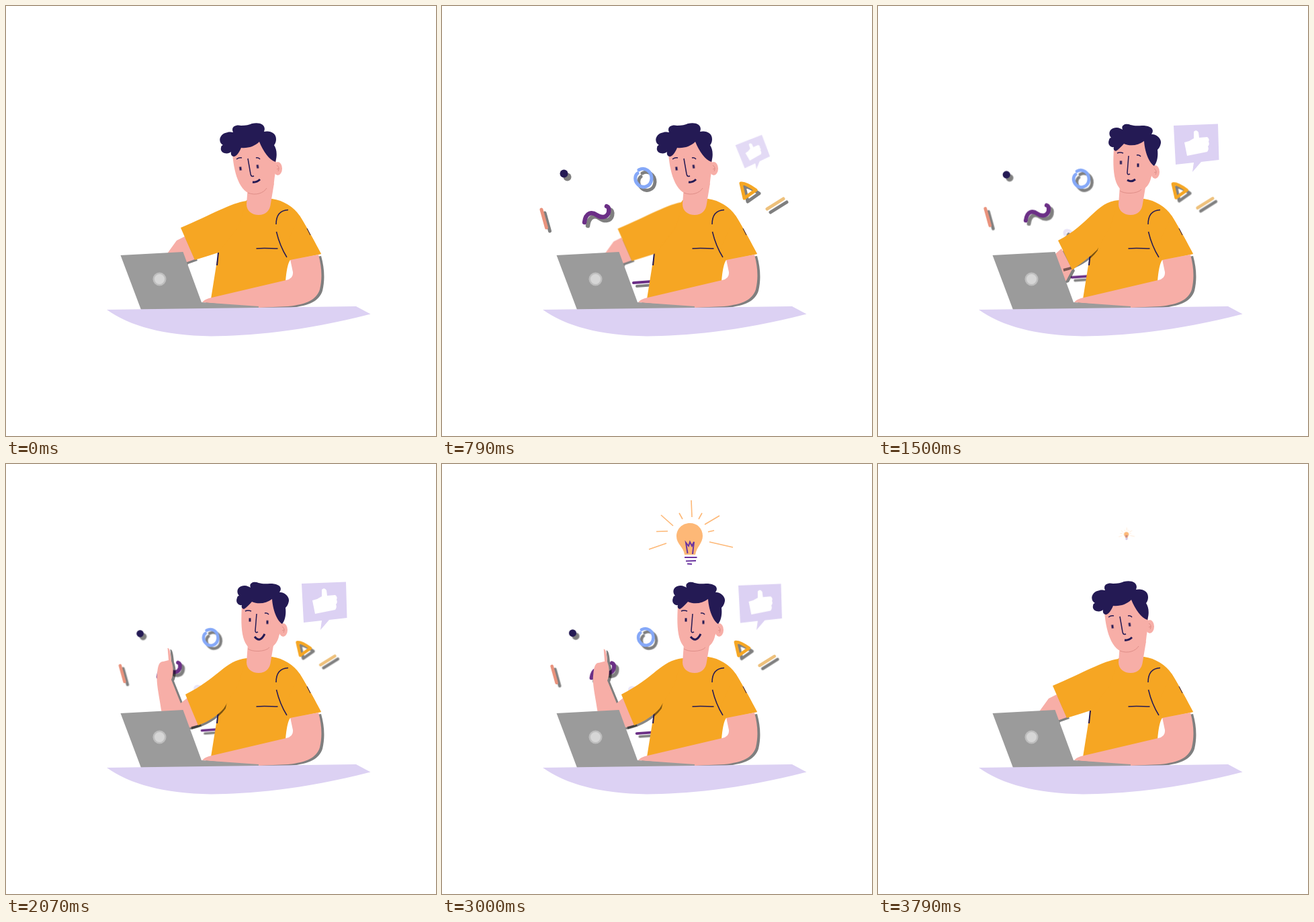
Animation, 640 px wide and 640 px high, one loop 3.87 s. Source, as an HTML page:

```html
<!DOCTYPE html>
<html lang="en">
<head>
<meta charset="utf-8">
<title>Bright idea at the desk</title>
<style>
  html, body { margin: 0; width: 100%; height: 100%; overflow: hidden; background: #fff; }
  svg { display: block; width: 100vw; height: 100vh; }

  .skin { fill: #f7aea7; }
  .shirt { fill: #f6a623; }
  .ink { fill: #241a54; }
  .line { fill: none; stroke: #241a54; stroke-width: 1.5; }
  .crease { fill: none; stroke: #d98781; stroke-width: .8; }
  .lilac { fill: #dcd1f3; }
  .round { fill: none; stroke-width: 5; stroke-linecap: round; stroke-linejoin: round; }
  .rays { fill: none; stroke: #fdb877; stroke-width: 1.6; }
  .shade { filter: drop-shadow(4px 2px 0 #00000080); }

  .anim, .pose { animation: 3.87s infinite; }
  .anim { animation-timing-function: cubic-bezier(.37, 0, .63, 1); }
  .pose { animation-timing-function: ease-in-out; }

  #confetti { animation-name: burst; transform-origin: 343px 276px; filter: drop-shadow(5px 5px 0 #00000080); }
  @keyframes burst {
    0%, 1% { transform: scale(0); animation-timing-function: ease-out; }
    12.9% { transform: scale(1.035); }
    20.4% { transform: scale(1); }
    23.5% { transform: scale(1.003); }
    33.8% { transform: scale(.885); }
    44.3% { transform: scale(1.005); }
    54% { transform: scale(.887); }
    65.1% { transform: scale(1.005); }
    72.4% { transform: scale(.92); }
    76.2% { transform: scale(.97); }
    85% { transform: scale(.07); }
    87.5%, 100% { transform: scale(0); }
  }

  #bubble { animation-name: like; transform-origin: 468px 247px; }
  @keyframes like {
    0%, 16.5% { transform: rotate(-30deg) scale(0); opacity: .6; animation-timing-function: linear; }
    20.4% { transform: translateY(-4px) rotate(-19deg) scale(.64); opacity: .8; }
    24% { transform: rotate(0deg) scale(1.4); opacity: 1; }
    31.3% { transform: scale(1.1); }
    35% { transform: scale(.97); }
    38.7%, 76% { transform: scale(1); opacity: 1; }
    85% { transform: scale(.45); opacity: 1; }
    88.6%, 100% { transform: scale(0); }
  }

  #bulb { animation-name: idea; transform-origin: 370px 104px; }
  @keyframes idea {
    0%, 53.5% { transform: scale(0); }
    59.2% { transform: scale(1.74); }
    61% { transform: scale(1.9); }
    66.4% { transform: scale(1.03); }
    68.2%, 79% { transform: scale(1); animation-timing-function: ease-in; }
    85% { transform: scale(.96); animation-timing-function: linear; }
    97.9% { transform: scale(.19); opacity: 1; }
    100% { transform: scale(0); opacity: .7; }
  }

  #arm { animation-name: typing; }
  @keyframes typing {
    0%, 14.7%, 29.5%, 100% { transform: none; }
    7.4% { transform: translate(2px, 2px); }
    20.4% { transform: translate(1.5px, 1.5px); }
  }

  #forearm { animation-name: forearm; }
  @keyframes forearm {
    0%, 30%, 93%, 100% { d: path("M238 390C239 388 239 386 240 384C240 378 240 372 241 367L254 349L266 343L281 377L267 382C262 395 250 395 245 395C243 395 241 395 240 394C239 394 239 393 238 392L238 391Z"); }
    37.5%, 42% { d: path("M240 402C240 400 240 399 241 398C241 395 242 390 243 385L264 369L273 361L289 392L280 409C272 412 262 412 258 412C253 412 248 411 246 410C243 408 241 406 240 405L240 403Z"); }
    52%, 76% { d: path("M240.5 274C243 273 245 279 246 293C250 303 249 315 246 321L260 356L270 348L287 388L272 393C250 395 234 385 231 366C228 345 223 325 225 312C226 300 228 294 234 294L242 292Z"); }
    85% { d: path("M243 302C246 301 247 306 248 320C252 330 250 340 247 343L259 355L268 348L285 386L271 389C250 395 236 385 233 366C231 358 228 350 228 338C228 326 229 322 235 322L244 320Z"); }
  }

  #sleeve { animation-name: sleeve; }
  @keyframes sleeve {
    0%, 30%, 93%, 100% { d: path("M358 290C335 293 305 311 260 330C267 346 274 362 281 378C293 374 305 371 316 367L345 330Z"); }
    37.5%, 42% { d: path("M358 289C325 291 315 325 268 349C276 365 283 380 289 393C302 383 315 374 326 363L345 330Z"); }
    52%, 76% { d: path("M358 289C325 293 317 318 267 343C274 360 280 375 286 389C303 383 315 374 324 364L345 330Z"); }
    85% { d: path("M358 290C327 293 313 320 266 341C273 358 280 373 286 388C301 381 312 374 321 366L345 330Z"); }
  }

  #fold { animation-name: fold; }
  @keyframes fold {
    0%, 31%, 85%, 100% { opacity: 0; }
    38%, 76% { opacity: 1; }
  }

  #face { animation-name: face; }
  @keyframes face {
    0%, 29.5%, 94.6%, 100% { d: path("M337 220C340 255 350 281 372 281C389 281 398 272 399 262C400 250 404 235 401 226L378 200L350 209Z"); }
    36.2%, 77.5% { d: path("M351 212C349 245 350 279 377 279C396 278 404 266 406 257C408 250 412 240 411 232L397 201L366 204Z"); }
  }

  #hair { animation-name: hair; }
  @keyframes hair {
    0%, 29.5%, 94.6%, 100% { d: path("M340 224C336 224 334 221 335 217C330 222 318 219 320 211C320 208 322 207 323 207C315 203 317 190 330 188C333 187 336 188 338 188C334 179 343 176 350 178C357 178 362 177 366 175C378 172 388 177 384 187C393 185 402 189 402 198C402 203 400 206 399 207C403 213 404 222 401 232C392 229 383 217 377 202C370 209 360 212 350 211C348 216 344 223 340 224Z"); }
    36.2%, 77.5% { d: path("M354 216C351 215 350 213 351 210C346 211 341 206 344 199C344 197 346 196 347 196C341 189 346 181 355 181C359 181 362 183 364 184C361 177 369 174 376 177C383 179 388 178 393 178C404 178 413 182 407 191C414 190 422 197 421 204C420 210 417 213 416 214C417 222 416 232 411 238C403 233 397 216 396 201C387 208 375 209 366 205C362 209 358 214 354 216Z"); }
  }

  #chin { animation-name: chin; }
  @keyframes chin {
    0%, 29.5%, 94.6%, 100% { d: path("M360 278C372 283 384 278 388 271"); }
    36.2%, 77.5% { d: path("M360 275C366 280 386 280 392 273"); }
  }

  #ear { animation-name: ear; }
  @keyframes ear {
    0%, 29.5%, 94.6%, 100% { transform: none; }
    36.2%, 77.5% { transform: translate(8px, 5px); }
  }

  #brows { animation-name: brows; }
  @keyframes brows {
    0%, 29.5%, 94.6%, 100% { d: path("M343 228Q347 225 351 226M372 226Q376 225 378 228"); }
    36.2%, 77.5% { d: path("M356 219Q360 217 365 219M385 222Q389 221 391 224"); }
  }

  #nose { animation-name: nose; }
  @keyframes nose {
    0%, 29.5%, 94.6%, 100% { d: path("M360 227L364 250Q365 255 369 253"); }
    36.2%, 77.5% { d: path("M373 223L371 248Q371 252 375 250"); }
  }

  #mouth { animation-name: mouth; stroke-width: 3; }
  @keyframes mouth {
    0%, 29.5%, 94.6%, 100% { d: path("M367 262Q373 263 378 258"); }
    36.2%, 42% { d: path("M371 259Q377 263 383 258"); }
    50%, 77.5% { d: path("M370 257Q378 267 385 253"); }
  }

  #eye1 { animation-name: eye1; }
  @keyframes eye1 {
    0%, 29.5%, 94.6%, 100% { transform: translate(349px, 242px) rotate(-8deg); }
    36.2%, 42% { transform: translate(361.5px, 233px) rotate(0deg); }
    50%, 77.5% { transform: translate(363px, 232px) rotate(0deg); }
  }
  #eye2 { animation-name: eye2; }
  @keyframes eye2 {
    0%, 29.5%, 94.6%, 100% { transform: translate(374.5px, 239px) rotate(-8deg); }
    36.2%, 42% { transform: translate(387px, 237px) rotate(0deg); }
    50%, 77.5% { transform: translate(389px, 235.5px) rotate(0deg); }
  }
  .lid { animation-name: blink; }
  @keyframes blink {
    0%, 66%, 70.5%, 100% { transform: none; }
    67.5%, 69% { transform: scaleY(.15); }
  }
</style>
</head>
<body>
<svg viewBox="0 0 640 640">
  <g id="confetti" class="anim round">
    <circle class="ink" cx="181.5" cy="249.5" r="6"/>
    <path stroke="#e9927c" d="M148 303L155.5 330"/>
    <path stroke="#6b2f86" stroke-width="6.5" style="stroke-width:6.5" d="M212 322C214 307 223 306 230 311C237 316 246 315 248 307C249 302 248 299 245 298"/>
    <path stroke="#85a8f8" d="M293 244C302 239 312 246 312 257C311 270 298 272 292 266C285 259 288 251 291 249"/>
    <path stroke="#f5a623" d="M445 264Q452 263 467 274L450 286Z"/>
    <path stroke="#eec17c" d="M484 302L508 287"/>
    <path stroke="#6b2f86" style="stroke-width:4" d="M285 412L312 410"/>
    <path stroke="#e9e4f8" d="M274 344C272 337 279 336 284 341"/>
  </g>

  <g id="bubble" class="anim">
    <path class="lilac" d="M440 178L506 175.5L507.5 229L481 232L468 247L470 233L443 236Z"/>
    <path fill="#fff" d="M456 203L463 201L470 197V187Q474 183 477 188L478 196L490 195Q494 198 492 202Q494 206 491 209Q493 213 490 217L460 223Z"/>
  </g>

  <g id="bulb" class="anim">
    <path class="rays" d="M371 54L372 79M326 76L344 92M413 77L391 90M353 73L358 82M387 73L382 82M319 100.5L336 100M396 101L405 99M308 127L334 118M398 116L433 124"/>
    <path fill="#fdb877" d="M349 108C349 97 357 88 369 88C380 88 388 96 388 107C388 118 379 123 377 135H361C360 124 349 119 349 108Z"/>
    <path fill="none" stroke="#6a35a0" stroke-width="2" d="M365.500 133L363 117L367 122L369 116L372 122L375 116L373 134M361 139H379.500M363 144.500L378 144M365 148.500L372 149"/>
  </g>

  <g id="arm" class="pose">
    <g class="shade"><path id="forearm" class="skin pose" d="M238 390L254 349L266 343L281 377L267 382Z"/></g>
  </g>
  <path class="shirt" d="M358 289C368 287 385 287 396 287C413 289 429 300 437 312C450 333 460 352 469 369L423 378Q418 385 416 410L305 436L316 367L340 320Z"/>
  <path id="fold" class="pose" fill="none" stroke="#000" stroke-opacity=".5" stroke-width="4" d="M276 393C296 389 314 378 325 363L329 345"/>
  <path class="line" stroke-width="2" style="stroke-width:2" d="M316 367L314 386"/>
  <g style="animation-name:typing" class="pose"><path id="sleeve" class="shirt pose" d="M358 290L260 330L281 378L316 367L345 330Z"/></g>

  <g class="shade">
    <path class="skin" d="M423 377L465 370C470 388 471 405 467 422C462 437 448 444 420 447L376 449L292 441Q295 437 302 435L417 408Q428 406 427 396Z"/>
  </g>
  <path class="shirt" d="M437 312C450 333 460 352 469 369L423 378L415 360Z"/>
  <path class="line" d="M402 325C402 312 408 304 420 303.500M402.500 336C407 355 413 366 418 374M372.500 361C385 360 395 361 404.500 361"/>
  <path class="line" style="stroke-width:1" d="M448 331L453 341"/>

  <path class="skin" d="M360 268L358 295C358 305 366 311 376 311C387 311 393 304 394 294L399 264Z"/>
  <g id="ear" class="pose">
    <ellipse class="skin" cx="404.500" cy="242" rx="6.500" ry="10"/>
    <path class="crease" d="M403 237Q408 240 405 246M403 243L406 242"/>
  </g>
  <path id="face" class="skin pose"/>
  <path id="chin" class="crease pose"/>
  <path id="hair" class="ink pose"/>
  <path id="brows" class="line pose"/>
  <path id="nose" class="line pose"/>
  <path id="mouth" class="line pose"/>
  <g id="eye1" class="pose"><rect class="ink lid pose" x="-1.500" y="-2.600" width="3" height="5.200"/></g>
  <g id="eye2" class="pose"><rect class="ink lid pose" x="-1.500" y="-2.600" width="3" height="5.200"/></g>

  <path fill="#9b9b9b" d="M170.500 371L263.500 366L291 441L376 447V450L201 452Z"/>
  <circle cx="228.500" cy="406.500" r="10" fill="#bebebe"/>
  <circle cx="228.500" cy="406.500" r="7.500" fill="#d6d6d6"/>
  <path class="lilac" d="M150 452L521 447L542.500 458.500C440 485 360 491 305 491.500C235 490 185 477 150 452Z"/>
</svg>
</body>
</html>
```
